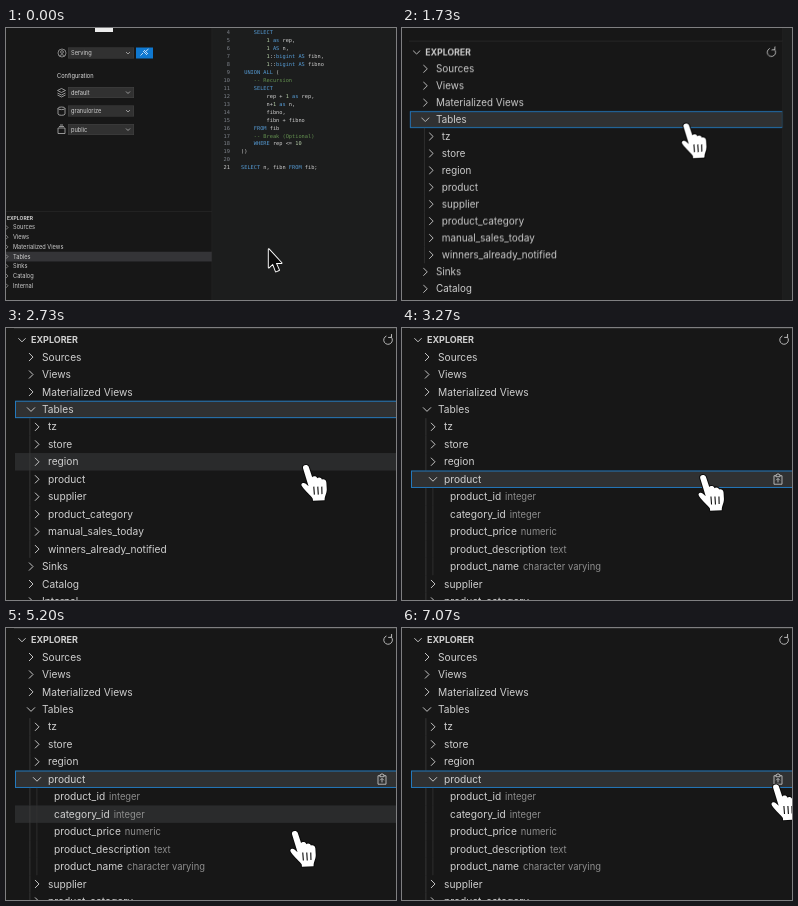
Animation of 390 by 272 pixels, one loop 7190 ms. Source, as an HTML page with a canvas:

```html
<!DOCTYPE html>
<html lang="en">
<head>
<meta charset="utf-8">
<title>Schema explorer</title>
<style>
html, body { margin: 0; width: 100%; height: 100%; overflow: hidden; background: #171717; }
canvas { display: block; width: 390px; height: 272px; }
</style>
</head>
<body>
<canvas id="stage" width="390" height="272"></canvas>
<script>
const LOOP = 7190, W = 390, H = 272;
const stage = document.getElementById('stage').getContext('2d');
const layer = document.createElement('canvas');
layer.width = W;
layer.height = H;
const c = layer.getContext('2d');

const SANS = 'Inter, "Open Sans", sans-serif';
const MONO = '"DejaVu Sans Mono", monospace';

// The camera zooms about one fixed point.
const WIDE = 0.556, FIX_X = -29.3, FIX_Y = 413, ZOOM_AT = 1030;
const ROW = 17.46, FIRST = 29;
const OPEN_TABLES = 1510, OPEN_PRODUCT = 3130;

// Pointer moves: start, speed, dx, dy; each settles like a damped spring.
const START = [496, 68];
const MOVES = [
  [50, 6, -202, 18],
  [2270, 7, 7, 62],
  [3900, 3.5, -13, 59],
  [5260, 5, 86, -50]
];
// Hovered row: from time, row index.
const HOVER = [[0, 3], [2480, 4], [2580, 5], [2690, 6], [2820, 7],
  [4230, 8], [4620, 9], [5560, 8], [5900, 7]];

const ROOTS = ['Sources', 'Views', 'Materialized Views', 'Tables'];
const TAIL = ['Sinks', 'Catalog', 'Internal'];
const TABLES = ['tz', 'store', 'region', 'product', 'supplier',
  'product_category', 'manual_sales_today', 'winners_already_notified'];
const COLUMNS = [['product_id', 'integer'], ['category_id', 'integer'],
  ['product_price', 'numeric'], ['product_description', 'text'],
  ['product_name', 'character varying']];

const CODE = `    SELECT
        1 as rep,
        1 AS n,
        1::bigint AS fibn,
        1::bigint AS fibno
 UNION ALL (
    -- Recursion
    SELECT
        rep + 1 as rep,
        n+1 as n,
        fibno,
        fibn + fibno
    FROM fib
    -- Break (Optional)
    WHERE rep <= 10
))

SELECT n, fibn FROM fib;`.split('\n');
const TOKENS = /--.*|\b(?:select|as|bigint|union|all|from|where)\b|\b\d+\b|\s+|\w+|[^\w\s]/gi;

const HAND = new Path2D('M-2.8 2.4C-3.4-1 1.8-1.6 3 1.4L6.4 11.6C7.4 10 10.8 10.2 11.6 12.6' +
  'C12.8 11.2 15.6 11.8 16.2 14C17.8 13.2 20.4 14.2 20.6 17L21 23.5C21 28 18.8 30 18.8 34.6' +
  'L7.2 35.2L7 33C5 29.6 0 26 -3.8 20.6C-5.8 17.6 -2.2 16.2 0 18.2L2.8 20.6Z');
const CREASES = new Path2D('M8 21L8.6 29M12 21L12.5 29M16 21L16.2 28.5');
const ARROW = new Path2D('M0 0V33L7.5 26L12.8 40L18.4 37.6L12.8 25H23Z');

const spring = (ms, speed) => {
  const x = Math.max(0, ms) / 1000 * speed;
  return 1 - (1 + x) * Math.exp(-x);
};

function zoomTo(k) {
  c.setTransform(k, 0, 0, k, FIX_X * (1 - k), FIX_Y * (1 - k));
}

function box(x, y, w, h, color) {
  c.fillStyle = color;
  c.fillRect(x, y, w, h);
}

function text(str, x, y, size, color, family = SANS, weight = 400) {
  c.font = `${weight} ${size}px ${family}`;
  c.fillStyle = color;
  c.fillText(str, x, y);
}

function line(d, color, width = 1) {
  c.strokeStyle = color;
  c.lineWidth = width;
  c.stroke(new Path2D(d));
}

function chevron(x, y, open, r = 2, color = '#c5c5c5', width = 1) {
  line(open ? `M${x - 2 * r} ${y - r}L${x} ${y + r}L${x + 2 * r} ${y - r}`
            : `M${x - r} ${y - 2 * r}L${x + r} ${y}L${x - r} ${y + 2 * r}`, color, width);
}

function select(label, y) {
  box(62, y - 5.5, 66, 11, '#434343');
  box(62.5, y - 5, 65, 10, '#313131');
  text(label, 65, y + 2, 5.7, '#d0d0d0');
  chevron(122, y, true, 1, '#c5c5c5', 0.7);
}

function drawSettings() {
  const ink = '#b4b4b4';
  box(89, -14, 18, 18, '#ececec');
  line('M60 25A4 4 0 1 1 52 25A4 4 0 1 1 60 25M57.4 24A1.4 1.4 0 1 1 54.6 24' +
    'A1.4 1.4 0 1 1 57.4 24M53.4 27.8Q56 25.2 58.6 27.8', ink, 0.7);
  select('Serving', 25);
  box(130, 19.5, 17, 11, '#0f78d0');
  line('M134.5 27.5L137 25M137 23L141 27M138 22L142 26M139.5 23.5L142.5 21', '#e6f2ff', 0.8);
  text('Configuration', 51, 50.3, 5.7, '#dcdcdc');
  line('M51.5 62.5L55.5 60.5L59.5 62.5L55.5 64.5ZM51.5 65L55.5 67L59.5 65M51.5 67L55.5 69L59.5 67', ink, 0.8);
  select('default', 64.5);
  line('M52 80.3A3.5 1.3 0 1 1 59 80.3A3.5 1.3 0 1 1 52 80.3V86A3.5 1.3 0 0 0 59 86V80.3', ink, 0.8);
  select('granulorize', 83);
  line('M52 100H59V105.5H52ZM53 98.5H58M54 97H57', ink, 0.8);
  select('public', 101.5);
}

function drawEditor() {
  box(206, -200, 500, 900, '#1c1d1d');
  box(205.6, -200, 0.5, 900, '#262626');
  CODE.forEach((src, i) => {
    const y = 5.9 + i * 7.97, last = i === CODE.length - 1;
    c.textAlign = 'right';
    text(i + 4, 224, y, 5.3, last ? '#cfcfcf' : '#7d828a', MONO);
    c.textAlign = 'left';
    let x = 235;
    for (const word of src.match(TOKENS) || []) {
      const color = word.startsWith('--') ? '#63904f'
        : /^\d/.test(word) ? '#b5cea8'
        : /^(select|as|bigint|union|all|from|where)$/i.test(word) ? '#569cd6' : '#d0d0d0';
      text(word, x, y, 5.3, color, MONO);
      x += word.length * 3.19;
    }
  });
}

function treeRows(t) {
  const root = (name) => ({ name, level: 0, open: name === 'Tables' && t >= OPEN_TABLES });
  const rows = ROOTS.map(root);
  if (t >= OPEN_TABLES) {
    for (const name of TABLES) {
      const open = name === 'product' && t >= OPEN_PRODUCT;
      rows.push({ name, level: 1, open });
      if (open) COLUMNS.forEach(([col, type]) => rows.push({ name: col, type, level: 2 }));
    }
  }
  return rows.concat(TAIL.map(root));
}

function drawExplorer(t, inside) {
  box(8, 0, 386, 1, '#2b2b2b');
  chevron(16, 12, true, 1.8);
  text('EXPLORER', 25, 15.2, 9, '#cfcfcf', SANS, 700);
  if (inside) {
    line('M385 8.8A4.3 4.3 0 1 1 380.4 8M385.6 6V9.4H382.2', '#b8b8b8', 1);
  }
  const rows = treeRows(t);
  const hover = HOVER.filter(([at]) => at <= t).pop()[1];
  const focus = t < OPEN_TABLES ? -1 : t < OPEN_PRODUCT ? 3 : 7;
  rows.forEach((row, i) => {
    const y = FIRST + i * ROW, top = y - ROW / 2;
    if (i === focus) {
      box(9, top, 385, ROW, '#2479bd');
      box(10, top + 1, 383, ROW - 2, '#303132');
    } else if (i === hover) {
      box(9, top, 385, ROW, t < OPEN_TABLES ? '#343437' : '#2a2b2c');
    }
    if (row.level > 0 && i !== focus) box(23.5, top, 0.8, ROW, '#3c3c3c');
    if (row.level > 1) box(30.5, top, 0.8, ROW, '#333');
    const x = 36 + 6 * row.level;
    if (row.level < 2) chevron(x - 11, y, row.open);
    text(row.name, x, y + 3.6, 10.2, '#cfcfcf');
    if (row.type) {
      const end = x + c.measureText(row.name).width + 4;
      text(row.type, end, y + 3.6, 9.4, '#8e8e8e');
    }
    if (i === 7 && focus === 7) {
      c.save();
      c.translate(376, y);
      line('M-2 -3.5H-4V5H4V-3.5H2M-2 -2.5V-4.5H-1A1 1 0 0 1 1 -4.5H2V-2.5ZM0 3.2V-.6M-1.8 1L0 -.8L1.8 1', '#c0c0c0', 0.9);
      c.restore();
    }
  });
}

function pointer(t) {
  return MOVES.reduce(([x, y], [at, speed, dx, dy]) => {
    const p = spring(t - at, speed);
    return [x + dx * p, y + dy * p];
  }, START);
}

function drawPointer([x, y], inside) {
  c.translate(x, y);
  c.lineJoin = 'round';
  c.fillStyle = inside ? '#fff' : '#0b0b0b';
  c.strokeStyle = inside ? '#0b0b0b' : '#fff';
  c.lineWidth = inside ? 2 : 3.4;
  const shape = inside ? HAND : ARROW;
  c.stroke(shape);
  c.fill(shape);
  if (inside) {
    c.lineWidth = 1.1;
    c.stroke(CREASES);
  }
}

function drawScene(t) {
  const scale = WIDE + (1 - WIDE) * spring(t - ZOOM_AT, 6.2);
  const tip = pointer(t), inside = tip[0] < 394;
  c.setTransform(1, 0, 0, 1, 0, 0);
  box(0, 0, W, H, '#171717');
  zoomTo(scale / WIDE);
  drawSettings();
  zoomTo(scale);
  drawExplorer(t, inside);
  zoomTo(scale / WIDE);
  drawEditor();
  zoomTo(scale);
  drawPointer(tip, inside);
}

// Average a few moments during the zoom for motion blur.
function render(t) {
  const count = t > ZOOM_AT && t < 1950 ? 8 : 1;
  for (let i = 0; i < count; i++) {
    drawScene(t + ((i + 0.5) / count - 0.5) * 18 * (count > 1));
    stage.globalAlpha = 1 / (i + 1);
    stage.drawImage(layer, 0, 0);
  }
}

const began = performance.now();
function tick() {
  render((performance.now() - began) % LOOP);
  requestAnimationFrame(tick);
}
tick();
</script>
</body>
</html>
```
